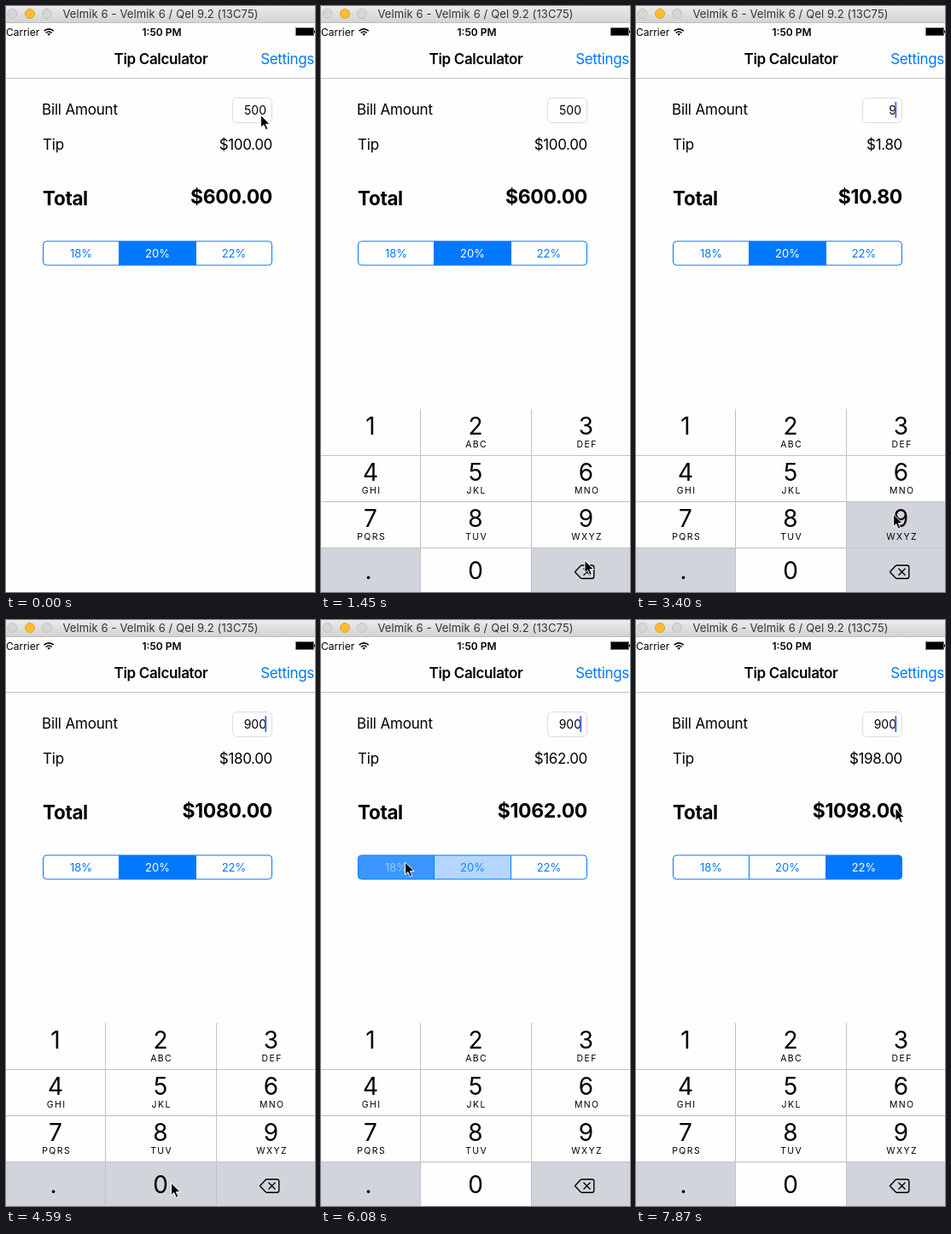
Recreate the animation shown at these times as an HTML page. Size 362x685 px, loop 8 s.

```html
<!DOCTYPE html>
<html lang="en">
<head>
<meta charset="utf-8">
<title>Tip Calculator</title>
<style>
  html, body { margin: 0; width: 100%; height: 100%; overflow: hidden; background: #fefefe; }
  svg { display: block; width: 100%; height: 100%; font-family: Inter, Roboto, sans-serif; }
  .body { font-size: 17px; letter-spacing: -.02em; }
  .label { font-size: 17px; letter-spacing: -.01em; }
  .big { font-size: 23px; font-weight: 700; letter-spacing: -.015em; }
  .small { font-size: 12px; }
  .bold { font-weight: 600; }
  .mid { text-anchor: middle; }
  .end { text-anchor: end; }
  .digit { font-size: 28px; text-anchor: middle; }
  .letters { font-size: 10.5px; letter-spacing: 1.4px; text-anchor: middle; }
  .segment { font-size: 13px; text-anchor: middle; }
  .line { fill: none; stroke: #0078ff; }
</style>
</head>
<body>
<svg viewBox="0 0 362 685">
  <defs>
    <linearGradient id="chrome" x2="0" y2="1">
      <stop stop-color="#ebebeb"/><stop offset="1" stop-color="#d3d3d3"/>
    </linearGradient>
  </defs>
  <rect width="362" height="685" fill="#fefefe"/>

  <!-- Window title -->
  <rect width="362" height="19" fill="url(#chrome)"/>
  <path d="M0 19.5H362" stroke="#bdbdbd"/>
  <g fill="#d6d6d6" stroke="#c2c2c2">
    <circle cx="7.5" cy="9" r="5.5"/>
    <circle cx="28" cy="9" r="5.5" fill="#fdbd2f" stroke="#e0a32c"/>
    <circle cx="48" cy="9" r="5.5"/>
  </g>
  <text x="181" y="14" class="mid" font-size="13" letter-spacing=".12" fill="#333">Velmik 6 - Velmik 6 / Qel 9.2 (13C75)</text>

  <!-- Status and navigation bars -->
  <text x="0" y="35" class="small">Carrier</text>
  <g fill="none" stroke="#000" stroke-width="1.6">
    <path d="M44.6 29.2Q50.2 24.4 55.8 29.2M46.7 31.5Q50.2 28.5 53.7 31.5"/>
    <path d="M48.3 32.6Q50.2 31.2 52.1 32.6L50.2 34.8Z" fill="#000" stroke="none"/>
  </g>
  <text x="182.5" y="35" class="small bold mid">1:50 PM</text>
  <rect x="339.5" y="25.5" width="21" height="9" stroke="#777"/>
  <path d="M361 28.5H362V31.5H361Z"/>
  <text x="181.5" y="68" class="body bold mid">Tip Calculator</text>
  <text x="361" y="68" class="body end" fill="#0078ff">Settings</text>
  <path d="M0 84.5H362" stroke="#c4c4c4"/>

  <!-- Form -->
  <text x="42" y="127" class="label">Bill Amount</text>
  <text x="43" y="168" class="label">Tip</text>
  <text x="43" y="233" class="big" style="font-size: 22.5px">Total</text>
  <rect x="265.5" y="107.5" width="46" height="29" rx="5" fill="#fff" stroke="#dcdcdc"/>
  <text id="bill" x="305" y="126.5" class="end" font-size="14"></text>
  <rect id="caret" x="303.3" y="112" width="2" height="19" rx="1" fill="#426bf2"/>
  <text id="tip" x="312" y="168" class="body end"></text>
  <text id="total" x="312" y="231" class="big end"></text>
  <g id="segments"></g>

  <g id="keypad"></g>
  <path id="cursor" d="M0 0V14.6L3.4 11.5 5.9 17.2 8.4 16.1 5.9 10.6H10.6Z" stroke="#fff"/>
</svg>
<script>
const LOOP = 8000;
const BLUE = [0, 120, 255], WHITE = [255, 255, 255];
const $ = id => document.getElementById(id);

function add(parent, tag, attrs, text = '') {
  const node = document.createElementNS('http://www.w3.org/2000/svg', tag);
  for (const name in attrs) node.setAttribute(name, attrs[name]);
  node.textContent = text;
  return parent.appendChild(node);
}

const mix = (a, b, p) => `rgb(${a.map((v, i) => Math.round(v + (b[i] - v) * p))})`;

// Segmented control
const edges = [43.5, 132.5, 222.5, 311.5];
const segments = ['18%', '20%', '22%'].map((label, i) => {
  const x = edges[i], width = edges[i + 1] - x;
  const shape = [`M${x + 4} 275H${x + width}V303H${x + 4}Q${x} 303 ${x} 299V279Q${x} 275 ${x + 4} 275Z`,
    `M${x} 275H${x + width}V303H${x}Z`,
    `M${x} 275H${x + width - 4}Q${x + width} 275 ${x + width} 279V299Q${x + width} 303 ${x + width - 4} 303H${x}Z`][i];
  return {
    fill: add($('segments'), 'path', { d: shape }),
    label: add($('segments'), 'text', { x: x + width / 2, y: 294, class: 'segment' }, label)
  };
});
add($('segments'), 'rect', { x: 43.5, y: 275, width: 268, height: 28, rx: 4, class: 'line' });
add($('segments'), 'path', { d: 'M132.5 275V303M222.5 275V303', class: 'line' });

// Number pad
const GREY = '#d1d5db', PLAIN = '#fefefe';
const columns = [0, 116, 246, 362], rows = [471, 525, 579, 633, 685];
const centers = [58, 181, 310.5];
const letters = ['', 'ABC', 'DEF', 'GHI', 'JKL', 'MNO', 'PQRS', 'TUV', 'WXYZ'];
const keys = {};
[1, 2, 3, 4, 5, 6, 7, 8, 9, '.', 0, 'delete'].forEach((key, i) => {
  const col = i % 3, row = Math.floor(i / 3), pad = $('keypad');
  const idle = key === '.' || key === 'delete' ? GREY : PLAIN;
  keys[key] = add(pad, 'rect', {
    x: columns[col], y: rows[row], fill: idle,
    width: columns[col + 1] - columns[col], height: rows[row + 1] - rows[row]
  });
  if (key === 'delete') return;
  const x = key === '.' ? 55.5 : centers[col];
  add(pad, 'text', { x, y: row < 3 ? 500.5 + 54 * row : 670, class: 'digit' }, key);
  if (letters[i]) add(pad, 'text', { x: x + 1.2, y: 516 + 54 * row, class: 'letters' }, letters[i]);
});
add($('keypad'), 'path', { d: 'M116.5 471V685M246.5 471V685M0 525.5H362M0 579.5H362M0 633.5H362', stroke: '#bfc1c4' });
add($('keypad'), 'path', {
  d: 'M297.5 661.5L304 654.5Q305 653.7 306 653.7H317.3Q319.8 653.7 319.8 656.2V666.8Q319.8 669.3 317.3 669.3H306Q305 669.3 304 668.5ZM307.5 657.5L315.5 665.5M315.5 657.5L307.5 665.5',
  fill: 'none', stroke: '#000', 'stroke-width': 1.4, 'stroke-linejoin': 'round'
});

const bills = [[0, '500'], [11, '50'], [12, '5'], [13, ''], [23, '9'], [29, '90'], [31, '900']];
const selections = [
  [0, [0, 1, 0]],
  [41, [.77, .3, 0]], [42, [1, 0, 0]],
  [46, [.3, .77, 0]], [47, [0, 1, 0]],
  [51, [0, .3, .77]], [52, [0, 0, 1]]
];
const rates = [[0, .2], [41, .18], [46, .2], [51, .22]];
const blinks = [8, 17, 25, 35, 42, 49];
const pointer = [
  [0, 298.5, 127.5], [1, 298, 125], [3, 298, 125], [10, 309, 648], [16, 309, 648],
  [22, 301.5, 594], [23, 301.5, 594], [28, 193.5, 658], [34, 193.5, 658], [39, 98.5, 283],
  [42, 98.5, 283], [46, 205.5, 283.5], [47, 205.5, 283.5], [50, 268, 287], [52, 268, 287], [53, 304, 220]
];

const clamp = p => Math.min(1, Math.max(0, p));
const latest = (steps, tick) => steps.filter(s => s[0] <= tick).pop()[1];
const money = value => '$' + value.toFixed(2);

const tickAt = t => t < 1450 ? Math.floor(t / 150) : 10 + Math.floor((t - 1450) / 149.2);

function pointerAt(tick) {
  const next = pointer.findIndex(p => p[0] > tick);
  if (next < 0) return pointer[pointer.length - 1].slice(1);
  const [t0, x0, y0] = pointer[next - 1], [t1, x1, y1] = pointer[next];
  const p = (tick - t0) / (t1 - t0), ease = p * p * (3 - 2 * p);
  return [x0 + (x1 - x0) * ease, y0 + (y1 - y0) * ease];
}

function render(t) {
  const tick = tickAt(t);
  const bill = latest(bills, tick), tip = bill * latest(rates, tick);
  $('bill').textContent = bill;
  $('tip').textContent = money(tip);
  $('total').textContent = money(+bill + tip);

  const caretOn = tick >= 3 && !blinks.some(b => tick >= b && tick < b + 3);
  $('caret').setAttribute('opacity', +caretOn);

  latest(selections, tick).forEach((amount, i) => {
    segments[i].fill.setAttribute('fill', mix(WHITE, BLUE, amount));
    segments[i].label.setAttribute('fill', mix(BLUE, WHITE, amount * amount));
  });

  const hidden = (1 - clamp((tick - 2.6) / 2.8)) ** 2;
  $('keypad').setAttribute('transform', `translate(0 ${216 * hidden})`);
  keys.delete.setAttribute('fill', tick >= 11 && tick < 14 ? PLAIN : GREY);
  keys[9].setAttribute('fill', tick === 23 ? GREY : PLAIN);
  keys[0].setAttribute('fill', tick === 31 ? GREY : PLAIN);

  $('cursor').setAttribute('transform', `translate(${pointerAt(tick)})`);
}

const start = performance.now();
function frame() {
  render((performance.now() - start) % LOOP);
  requestAnimationFrame(frame);
}
frame();
</script>
</body>
</html>
```
